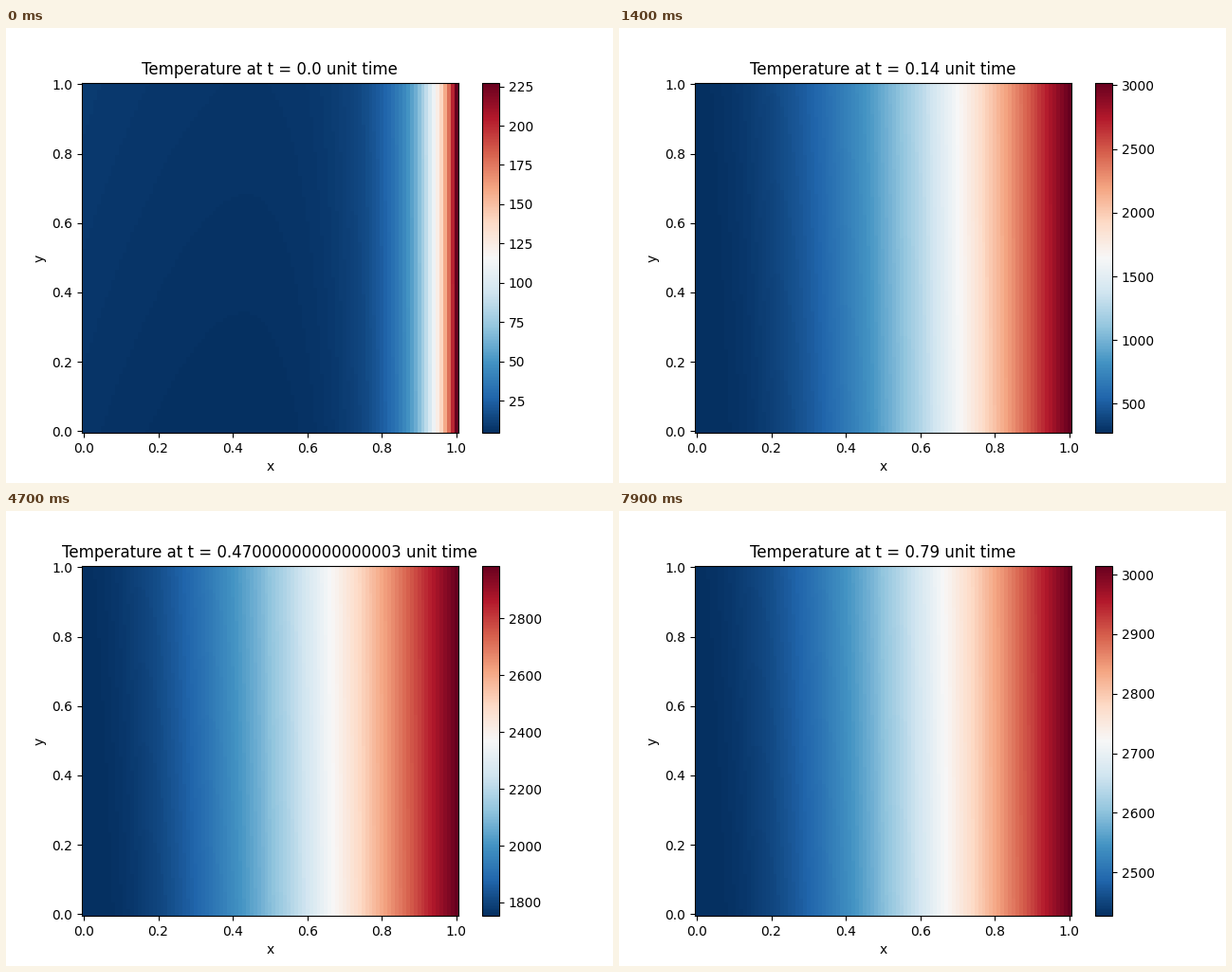
A matplotlib script that plays this animation: 640x480 px, repeating every 8 s.

```python
import numpy as np
import matplotlib.pyplot as plt
from matplotlib.animation import FuncAnimation

FRAMES, INTERVAL, DT, N = 80, 100, 0.01, 101

# Temperature range over time: knots of a smooth curve
LOW_T = [0, 0.03, 0.07, 0.12, 0.16, 0.20, 0.25, 0.39, 0.56, 0.69, 0.79]
LOW = [4.5, 9, 27, 178, 375, 595, 844, 1479, 1998, 2268, 2427]
HIGH_T = [0, 0.01, 0.02, 0.03, 0.045, 0.07, 0.11, 0.15, 0.25, 0.39, 0.56, 0.69, 0.79]
HIGH = [227.4, 800, 1455, 1970, 2485, 2865, 2995, 3025, 3017, 2990, 2988, 3001, 3015]

grid = np.linspace(0, 1, N)
X, Y = np.meshgrid(grid, grid)


def hermite(t, ts, vs):
    """Cubic Hermite curve through the knots."""
    slopes = np.gradient(np.array(vs, float), np.array(ts, float))
    i = int(np.clip(np.searchsorted(ts, t, side="right") - 1, 0, len(ts) - 2))
    h = ts[i + 1] - ts[i]
    s = (t - ts[i]) / h
    return ((1 + 2 * s) * (1 - s) ** 2 * vs[i] + s * s * (3 - 2 * s) * vs[i + 1]
            + h * s * (1 - s) * ((1 - s) * slopes[i] - s * slopes[i + 1]))


def diffusion(x, tau):
    """Unit heat flow from a hot wall at x=1, insulated at x=0."""
    u = np.ones_like(x)
    for n in range(40):
        k = (n + 0.5) * np.pi
        u -= 2 * (-1) ** n / k * np.exp(-k * k * tau) * np.cos(k * x)
    return u


def start_shape():
    basin = 0.0118 * (Y + 3 * (0.55 - X) ** 2)
    return np.exp((X - 1) / 0.08) + basin * (1 - X ** 4)


def unit(a):
    return (a - a.min()) / np.ptp(a)


def field(t):
    early = min(t / 0.07, 1)
    tau = 0.003 + 0.041 * early + max(t - 0.07, 0)
    tilted = X + 0.06 * (Y - 0.5) * (1 - X) ** 2
    shape = unit(diffusion(tilted, tau))
    if early < 1:
        w = (1 - early) ** 2
        shape = unit(w * unit(start_shape()) + (1 - w) * shape)
    low, high = hermite(t, LOW_T, LOW), hermite(t, HIGH_T, HIGH)
    return low + (high - low) * shape


fig, ax = plt.subplots(figsize=(6.4, 4.8), dpi=100)
mesh = ax.pcolormesh(X, Y, field(0), cmap="RdBu_r", shading="nearest")
fig.colorbar(mesh, ax=ax)
ax.set_xlabel("x")
ax.set_ylabel("y")
title = ax.set_title("")


def update(i):
    t = i * DT
    temp = field(t)
    mesh.set_array(temp)
    mesh.set_clim(temp.min(), temp.max())
    title.set_text(f"Temperature at t = {t} unit time")
    return mesh, title


anim = FuncAnimation(fig, update, frames=FRAMES, interval=INTERVAL,
                     repeat=True, repeat_delay=0, blit=False)
plt.show()
```
